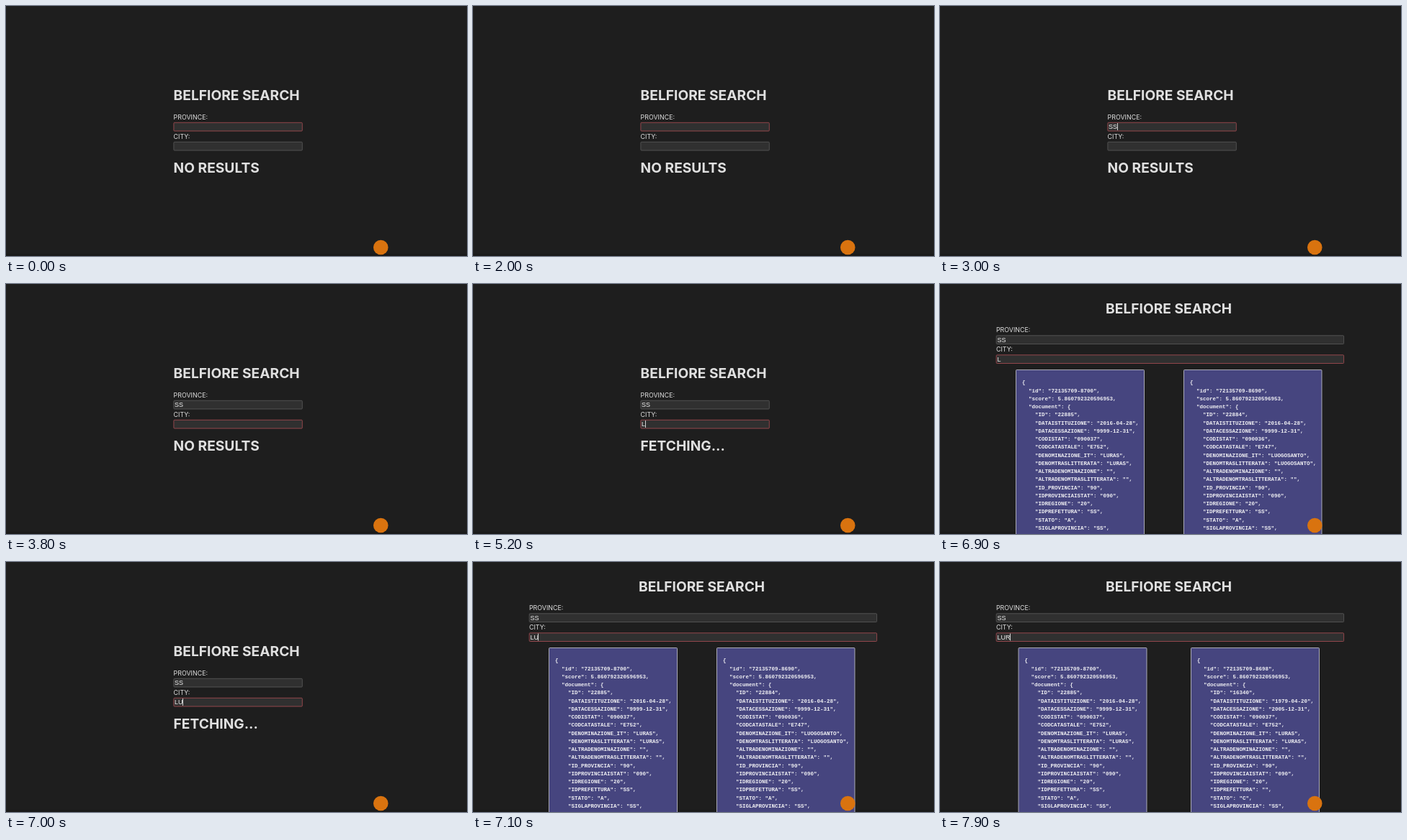
Animation of 640x348 px, one loop 8 s. Source, as an HTML page with a canvas:

```html
<!DOCTYPE html>
<html lang="en">
<head>
<meta charset="utf-8">
<title>Belfiore Search</title>
<style>
  html, body { margin: 0; width: 100%; height: 100%; overflow: hidden; background: #1e1e1e; }
  canvas { display: block; width: 640px; height: 348px; }
</style>
</head>
<body>
<canvas id="stage" width="640" height="348"></canvas>
<script>
const ctx = document.getElementById('stage').getContext('2d');
const LOOP = 8000;
const BLINK = 500;
const UI = 'Inter, sans-serif';
const INPUT_FONT = '9px "Liberation Sans", Arial, sans-serif';
const CODE_FONT = 'bold 7.5px "Liberation Mono", "Courier New", monospace';

const luras = {
  doc: '8700', id: '22885', from: '2016-04-28', to: '9999-12-31',
  istat: '090037', code: 'E752', name: 'LURAS', pref: 'SS', state: 'A'
};
const luogosanto = { ...luras, doc: '8690', id: '22884', istat: '090036', code: 'E747', name: 'LUOGOSANTO' };
const lurasOld = { ...luras, doc: '8698', id: '16340', from: '1979-04-20', to: '2005-12-31', pref: '', state: 'C' };

const broad = [[105.5, 178, luras], [338.5, 191.5, luogosanto]];
const narrow = [[109, 178, luras], [348.5, 178, lurasOld]];

// Each step restarts the caret blink; "wait" is how long the fetch message stays.
const steps = [
  { at: -500, province: '', city: '', focus: 0 },
  { at: 2600, province: 'S', city: '', focus: 0 },
  { at: 2700, province: 'SS', city: '', focus: 0 },
  { at: 3300, province: 'SS', city: '', focus: 1 },
  { at: 5200, province: 'SS', city: 'L', focus: 1, wait: 100, cards: broad },
  { at: 7000, province: 'SS', city: 'LU', focus: 1, wait: 100, cards: broad },
  { at: 7900, province: 'SS', city: 'LUR', focus: 1, wait: 0, cards: narrow }
];

function text(str, x, y, font, color) {
  ctx.font = font;
  ctx.fillStyle = color;
  ctx.fillText(str, x, y);
}

const heading = (str, x, y) => text(str, x, y, `bold 19.2px ${UI}`, '#e0e0e0');

function box(x, y, w, h, fill, stroke) {
  ctx.beginPath();
  ctx.roundRect(x, y, w, h, 1);
  ctx.fillStyle = fill;
  ctx.fill();
  ctx.strokeStyle = stroke;
  ctx.lineWidth = 0.9;
  ctx.stroke();
}

function field(label, value, x, y, w, focused, caret) {
  text(label, x, y - 4.4, `8.9px ${UI}`, '#dedede');
  box(x + 0.3, y + 0.3, w, 11.7, '#303030', focused ? '#9f4a50' : '#565656');
  const tx = x + 1.5;
  text(value, tx, y + 9.3, INPUT_FONT, '#f0f0f0');
  if (focused && caret) {
    const cx = Math.floor(tx + ctx.measureText(value).width);
    ctx.fillStyle = '#d0d0d0';
    ctx.fillRect(cx, y + 1, 1, 10);
  }
}

function jsonLines(r) {
  const fields = {
    ID: r.id,
    DATAISTITUZIONE: r.from,
    DATACESSAZIONE: r.to,
    CODISTAT: r.istat,
    CODCATASTALE: r.code,
    DENOMINAZIONE_IT: r.name,
    DENOMTRASLITTERATA: r.name,
    ALTRADENOMINAZIONE: '',
    ALTRADENOMTRASLITTERATA: '',
    ID_PROVINCIA: '90',
    IDPROVINCIAISTAT: '090',
    IDREGIONE: '20',
    IDPREFETTURA: r.pref,
    STATO: r.state,
    SIGLAPROVINCIA: 'SS'
  };
  return [
    '{',
    `  "id": "72135709-${r.doc}",`,
    '  "score": 5.860792320596953,',
    '  "document": {',
    ...Object.entries(fields).map(([key, value]) => `    "${key}": "${value}",`)
  ];
}

function card([x, w, record]) {
  box(x, 119.5, w, 240, '#46457f', '#b9b9c2');
  jsonLines(record).forEach((line, i) => text(line, x + 8.4, 139.3 + i * 11.26, CODE_FONT, '#f0f0f4'));
}

function draw(t) {
  const step = steps.filter(s => s.at <= t).pop();
  const age = t - step.at;
  const caret = Math.floor(age / BLINK) % 2 === 0;
  const fetching = step.cards && age < step.wait;
  const wide = step.cards && !fetching;
  const x = wide ? 77.9 : 232.6;
  const y = wide ? 71.5 : 162;
  const w = wide ? 482.4 : 178.4;

  ctx.fillStyle = '#1e1e1e';
  ctx.fillRect(0, 0, 640, 348);
  ctx.fillStyle = '#1a1a1a';
  ctx.fillRect(0, 345, 640, 3);

  heading('BELFIORE SEARCH', wide ? 230.1 : x, y - 31);
  field('PROVINCE:', step.province, x, y, w, step.focus === 0, caret);
  field('CITY:', step.city, x, y + 27, w, step.focus === 1, caret);

  if (wide) step.cards.forEach(card);
  else heading(fetching ? 'FETCHING...' : 'NO RESULTS', x, 232);

  ctx.beginPath();
  ctx.arc(520.3, 336, 10.3, 0, Math.PI * 2);
  ctx.fillStyle = '#d9730f';
  ctx.fill();
}

function tick() {
  draw(performance.now() % LOOP);
  requestAnimationFrame(tick);
}
tick();
</script>
</body>
</html>
```
